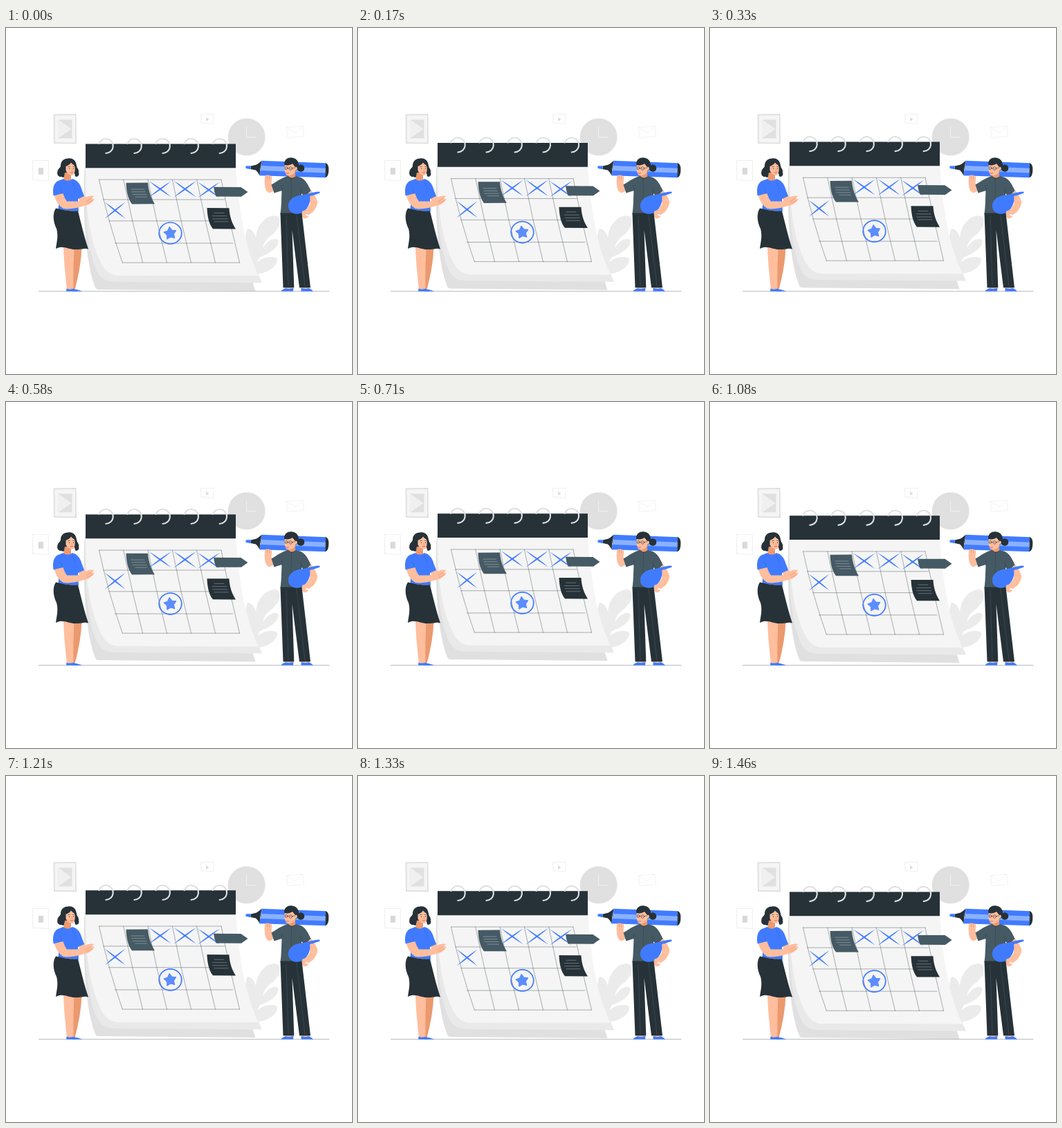
Animation, 500 px wide and 500 px high, one loop 1500 ms. Source, as an HTML page:

```html
<!DOCTYPE html>
<html lang="en">
<head>
<meta charset="utf-8">
<title>Planning calendar</title>
<style>
  html, body { margin: 0; width: 100%; height: 100%; overflow: hidden; background: #fff; }
  svg { display: block; width: 100vw; height: 100vh; }
  .blue { fill: #407bff; }
  .dark { fill: #263238; }
  .slate { fill: #455a64; }
  .skin { fill: #ffbe9d; }
  .shade { fill: #eb996e; }
  .line { fill: none; stroke-linecap: round; stroke-linejoin: round; }
</style>
</head>
<body>
<svg viewBox="0 0 500 500">
  <!-- wall -->
  <g>
    <path d="M68.5 124.5L101.5 124L102 167.5L69 167Z" fill="#e0e0e0"/>
    <path d="M70.5 126.3L100 126V165.5L70.8 165.3Z" fill="#f5f5f5"/>
    <path d="M75.5 132.5H95.5V159.5H75.5Z" fill="#e0e0e0"/>
    <path d="M75.5 132.5L94.5 146L75.5 159.5Z" fill="#f0f0f0"/>

    <path d="M38.5 191.5H61.5V220.5L38.5 219.5Z" fill="#fff" stroke="#efefef"/>
    <path d="M46.8 202H54V211.8H46.8Z" fill="#d9d9d9"/>

    <path d="M281.5 125L300.5 124.5L299.5 138.5L282 137Z" fill="#fff" stroke="#f0f0f0"/>
    <path d="M289 129.3L293.5 132.2L289.3 135Z" fill="#d9d9d9"/>

    <circle cx="347.7" cy="157.5" r="27" fill="#e0e0e0"/>
    <circle class="line" cx="347.7" cy="157.5" r="23.5" stroke="#dadada" stroke-width=".5"/>
    <path class="line" d="M347.5 143.5V158H360" stroke="#f2f2f2"/>

    <path class="line" d="M405.5 143.5L429 142L430.5 156.5L407.5 158.5ZM405.5 143.5L418.5 151.5L429 142" stroke="#efefef" stroke-width=".8"/>
  </g>

  <!-- plant -->
  <g fill="#ebebeb">
    <path d="M345 357C351 342 361 326 361 306C361 285 376 270 390 271C400 274 397 289 383 300C375 306 372 312 371 318C378 307 388 302 393 306C396 315 382 326 367 331L363 338C372 331 388 328 392 334C392 345 378 354 364 355Z"/>
    <path d="M357 338C345 324 344 299 349 290C359 290 365 307 362 327Z"/>
  </g>

  <g id="calendar">
    <path d="M115 196L113 208C111 286 117 345 129 375Q130 378.2 134 378.2L360.5 380.3L356 366L200 345Z" fill="#e0e0e0"/>
    <path d="M115 196L114 210C114 290 121 332 133 355Q139 366 155 367L370 368.5L362 350L200 340Z" fill="#e9e9e9"/>
    <path d="M115 200H332C334 232 340 284 349 315C354 334 360 347 365 358.3L163 358Q147 357.5 139 343C120 308 115 260 115 200Z" fill="#f5f5f5"/>
    <path d="M115 167.6H332V202.4H115Z" class="dark"/>
    <g id="rings" class="line" stroke="#e0e0e0" stroke-width="2.1"></g>
    <g id="grid" class="line" stroke="#263238" stroke-opacity=".7" stroke-width=".55"></g>
    <g id="marks" class="blue"></g>

    <path class="slate" d="M173.5 224L205 223.8C206 236 210 247 215 254.5L182 254.6C176 247 174 236 173.5 224Z"/>
    <path class="line" d="M181 233.3H200M182 237H201M183 240.8H203M187 244.3H203.5" stroke="#a6b0b5" stroke-width=".6"/>
    <path class="dark" d="M290.5 260.3L322.5 260.4C323 273 327 283 332 290.7L299 290.5C293 283 291 272 290.5 260.3Z"/>
    <path class="line" d="M301 267.5H315M298.5 271.8H319M299 276H320M301 280H321" stroke="#8f999e" stroke-width=".6"/>
    <path class="slate" d="M300 230L339.5 230.2L349.5 237.2L340 244L303.5 243.8Q301 238 300 230Z"/>

    <ellipse class="line" cx="237.5" cy="296.7" rx="16.3" ry="15.5" stroke="#407bff" stroke-width="1.7"/>
    <path id="star" fill="#5b8dff" stroke="#5b8dff" stroke-width="1.2" stroke-linejoin="round"/>
  </g>

  <path class="line" d="M47.5 380.4H467" stroke="#263238" stroke-opacity=".55" stroke-width=".6"/>

  <!-- left woman -->
  <g>
    <path class="shade" d="M96 316H109.5Q108.500 345 99.500 378H94.5Z"/>
    <path class="skin" d="M83 314H98.5C98 334 97 352 97.5 378H88C86 358 83.5 338 83 314Z"/>
    <path class="blue" d="M97 377.5C101 377 106 378.8 110.5 380.4H96Z"/>
    <path class="blue" d="M87.5 376.5Q92 378.5 97.5 376.5L103 380.4H87Z"/>
    <path class="skin" d="M103 240L111 238L114.5 245L122 242.5L126.5 243L120 250L107 252Z"/>
    <path class="dark" d="M90 188.5C83 188.5 79 193 79 199C79 202 75 203 74.500 207C73 212 76 215.500 80 215C85 217.500 89 214 91 210H99L100 214.500C104 216 106.500 212 105 209C106 206 103.500 203 102.500 201C101.500 196 101 193 98 190.500C95.500 188.500 92.500 188 90 188.500Z"/>
    <path class="shade" d="M85 209H94V220Q88 223 83 219Z"/>
    <path class="skin" d="M86.500 200C90 198.500 93 196.500 94 194.500C96 197 99 198 99.500 200.500C100 205 99.500 210 97 212.500C93 214 88 210 86.500 206Z"/>
    <g class="line" stroke="#263238" stroke-width=".9">
      <path d="M91.5 203V203.5M97.4 203V203.5"/>
      <path d="M89.8 200.7L92.3 200.2M96.5 200.2L98.3 200.6" stroke-width=".6"/>
      <path d="M95 203.5L96 206.5H94.5" stroke="#eb8a62" stroke-width=".6"/>
      <path d="M93 209Q95 210 97 208.5" stroke="#d9534f"/>
    </g>
    <path class="blue" d="M83 218C87 222 92 221 96 218C103 220 107 225 109 232L113 243L104 247L105 265L75 263C77 256 76 250 74 244L68.5 242C67 232 69 224 75 221Z"/>
    <path class="line" d="M79 231C80 236 82 240 82.5 245M96 222Q99 228 100 233" stroke="#2f60d0" stroke-width=".5"/>
    <path class="skin" d="M70 242L82.5 239C84 244 86 248 88 250.5C96 250.5 103 251 109 249.5L115 245C118 243 124 242 127.5 243.5L123.5 246.3L128 247C124 252 119 257 111 257.5C103 260 92 262.5 83 261C76 257 72 250 70 242Z"/>
    <path class="line" d="M115 251L123.5 246.3M117 253.5L126 249.5" stroke="#e88f66" stroke-width=".6"/>
    <path class="dark" d="M72 260.5C82 263 92 265 104 264.5C108 280 113 302 119 319.5C113 317.5 109 320.5 102 320C91 321 83 313 72 319C73 310 76 301 73 290C68 280 67 268 72 260.5Z"/>
  </g>

  <!-- right woman -->
  <g>
    <path class="blue" d="M369.5 191.7L463 195.3L462 216.3L366.5 213.3Z"/>
    <path d="M369 199L463 202.7L462.5 209.5L368 206Z" fill="#8cb0ff"/>
    <path class="dark" d="M462 195.2Q467 197 466.3 206Q466 215 461.5 216.3Z"/>
    <path class="dark" d="M369.5 191.7Q367 203 366.5 213.3Q364 208 361 205.500L353.500 204L354 199.500L362 197.500Q366 195 369.500 191.700Z"/>
    <path class="blue" d="M354 199.300L353.500 204.200L347 203Q345 200 348 199.300Z"/>

    <path class="skin" d="M374 214C378 211 383 213 384.5 216L383.5 224L388 235L380.5 238.5C374 236 373 227 374 214Z"/>
    <path class="line" d="M377.5 213V218M380.5 213.5V218" stroke="#e88f66" stroke-width=".6"/>
    <circle class="dark" cx="426" cy="202.5" r="5.3"/>
    <path class="dark" d="M402 197C402 190 407 187.200 412 187.200C420 187.500 424.500 194 422.500 201C421 206 417 209 411 208Z"/>
    <path class="shade" d="M409.5 207L418 203V216L413.5 219L408 216Z"/>
    <path class="skin" d="M403 198C407 199 411 198 414 196L418 201C421.500 199.500 422 204.500 418.500 206C417 211.500 411 214.500 406 213C402.500 210 402 203 403 198Z"/>
    <g class="line" stroke="#263238" stroke-width=".55">
      <circle cx="411.2" cy="203" r="2.3"/><circle cx="404.9" cy="202.500" r="2"/>
      <path d="M413.6 202.5L418 202M406.9 202.5H408.9M411 203V203.5M404.7 202.5V203"/>
      <path d="M404.5 210Q406.5 211 408.5 209.5" stroke="#d9534f" stroke-width=".9"/>
    </g>

    <path class="skin" d="M403 374H414V377H403ZM427 374H438V377H427Z"/>
    <path class="blue" d="M404 376.300Q410 378 415.500 375.500L415 380.400H397.500Q399 377.800 404 376.300ZM426.500 375.800Q432 378 438 376Q442 378 444 380.400H426.500Z"/>
    <path class="skin" d="M431 240L440.5 234C445 240 450 247 450 252C448 260 443 266 437 270L431 266C436 261 439 257 440 253Z"/>
    <path class="slate" d="M407 214Q413 219 420 214.5C430 216 434 221 440.5 235L431.5 244L427 239L427.500 269H396.5C398 257 398 246 398.5 235L387.5 238.5L383.5 226.5C391 222 399 216 407 214Z"/>
    <path class="line" d="M412.5 218L411.5 267M399 228L398.5 236M426 231L427 239" stroke="#263238" stroke-opacity=".55" stroke-width=".6"/>
    <path class="line" d="M407 214L412.5 218L419.5 214.5" stroke="#263238" stroke-width=".7"/>
    <path class="dark" d="M396.500 267.500H427.500L440 375.300H424L413.500 292L416.300 375.300H400.500Z"/>
    <path class="line" d="M405 271L408 373M420 271L432 373" stroke="#607078" stroke-width=".35"/>
    <path class="blue" d="M408 259C407 249 415 243 426 241.500C435 241 440 237 453 236.500Q455 238.500 451 239.500L439 243.500C441 252 436 262 428 267C418 271 410 268 408 259Z"/>
    <path class="skin" d="M428 265C433 262 438 263 439 266L432 270L437 272C435 276 430 276 428 273Z"/>
    <path class="skin" d="M440 242C447 246 452 251 449 257C446 264 442 268 437 270L430 265C436 261 440 255 440 250Z"/>
  </g>
</svg>
<script>
const LOOP = 1500, LIFT = 6.4, LEAD = 25;
const NS = "http://www.w3.org/2000/svg";
const $ = id => document.getElementById(id);

function addPath(parent, d) {
  const p = document.createElementNS(NS, "path");
  p.setAttribute("d", d);
  $(parent).append(p);
}

// A pen stroke that is thick in the middle and pointed at both ends.
function stroke(x1, y1, x2, y2) {
  const len = Math.hypot(x2 - x1, y2 - y1);
  const nx = -(y2 - y1) / len * 2, ny = (x2 - x1) / len * 2;
  const mx = (x1 + x2) / 2, my = (y1 + y2) / 2;
  addPath("marks", `M${x1} ${y1}Q${mx + nx} ${my + ny} ${x2} ${y2}Q${mx - nx} ${my - ny} ${x1} ${y1}Z`);
}

function cross(x, y, w = 16, h = 11.5) {
  stroke(x - w, y - h, x + w, y + h);
  stroke(x + w, y - h, x - w, y + h);
}

for (let i = 0; i < 5; i++) {
  addPath("rings", `M${134.3 + i * 41.1} 167.3A10.5 10.5 0 1 1 ${144.3 + i * 41.1} 181.2`);
}

for (let i = 0; i < 6; i++) {
  const top = 134.5 + i * 35.3;
  const bottom = i ? 162.5 + i * 35 : 168.3;
  const bend = (top + bottom) / 2 - (i ? 1.5 : 4);
  addPath("grid", `M${top} 219.3Q${bend} 280 ${bottom} 339.3`);
}
[[134.5, 311, 219.3], [140.5, 316, 248.2], [148.5, 322, 279],
 [157.5, 328, 311.2], [168.3, 337.5, 339.3]]
  .forEach(([a, b, y]) => addPath("grid", `M${a} ${y}H${b}`));

cross(222.8, 233);
cross(258.7, 233, 16.5, 12);
cross(293, 234.3);
cross(157.6, 263.8, 15, 12);

const star = [];
for (let i = 0; i < 10; i++) {
  const r = i % 2 ? 5.2 : 9.3, a = i * Math.PI / 5 - 1.7;
  star.push(`${237.3 + r * Math.cos(a)} ${297 + r * Math.sin(a)}`);
}
$("star").setAttribute("d", `M${star.join("L")}Z`);

// The calendar rises and sinks at an even speed.
const start = performance.now() - LEAD;
function draw(now) {
  const p = (Math.max(0, now - start) % LOOP) / LOOP;
  const y = LIFT * (1 - Math.abs(2 * p - 1));
  $("calendar").setAttribute("transform", `translate(0 ${-y})`);
  requestAnimationFrame(draw);
}
draw(performance.now());
</script>
</body>
</html>
```
